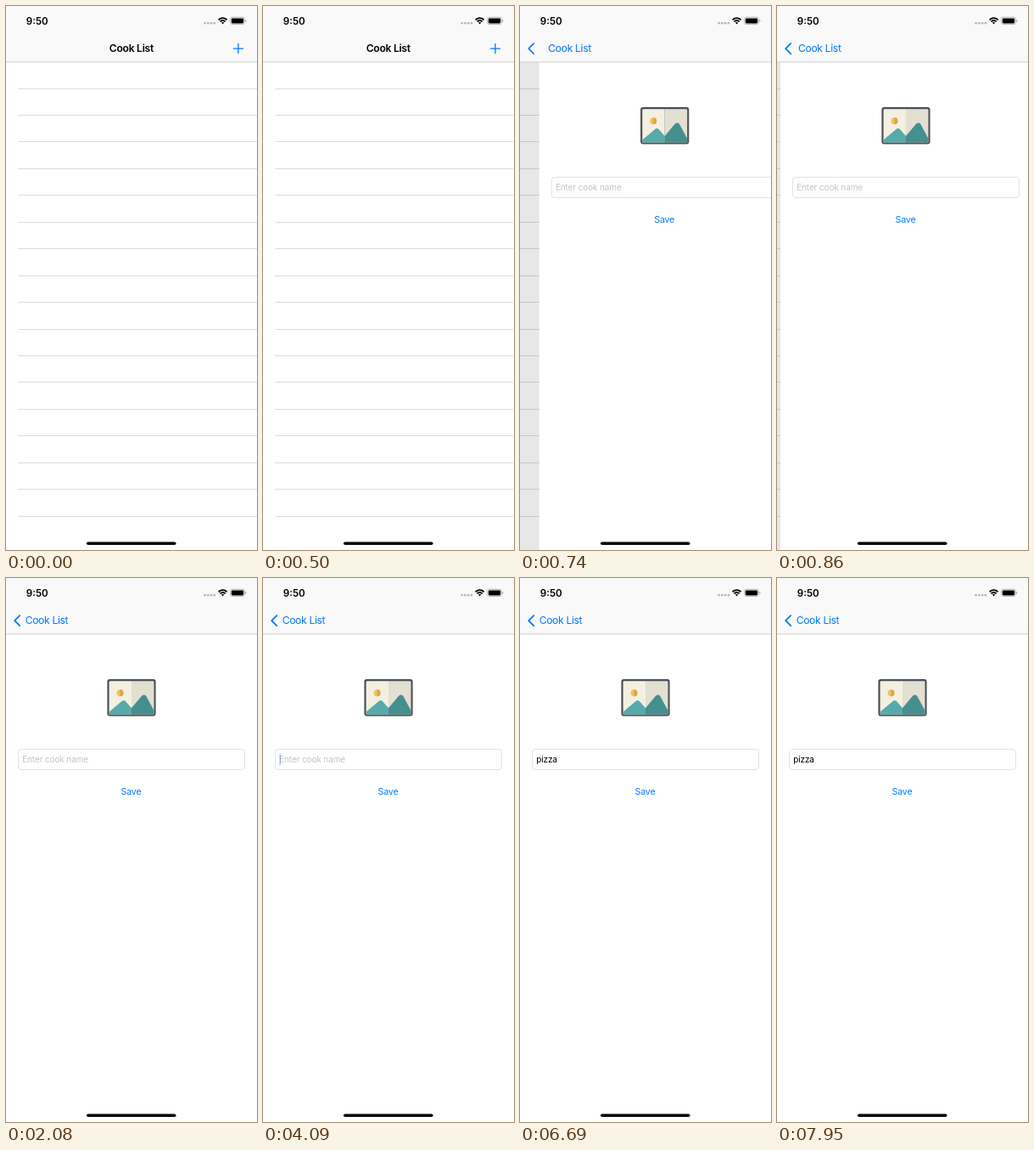
An HTML page that plays this animation: 296 px wide and 640 px high, repeating every 8000 ms.

```html
<!DOCTYPE html>
<html lang="en">
<head>
<meta charset="utf-8">
<title>Cook List</title>
<style>
  html, body { margin: 0; width: 100%; height: 100%; overflow: hidden; background: #fff; }
  svg { display: block; width: 296px; height: 640px; font-family: Inter, Roboto, sans-serif; }
  .blue { fill: #007aff; }
  .nav { font-size: 12.15px; text-anchor: middle; }
  .entry { font-size: 10px; letter-spacing: -.12px; }
</style>
</head>
<body>
<svg viewBox="0 0 296 640">
  <rect width="296" height="640" fill="#fff"/>
  <g id="list">
    <rect y="66" width="296" height="574" fill="#fff"/>
    <g id="rows" fill="#dcdcdc"></g>
  </g>
  <rect id="shade" y="66" width="296" height="574"/>

  <g id="form">
    <rect y="66" width="296" height="574" fill="#fff"/>
    <g id="picture">
      <rect x="119.4" y="119" width="57.2" height="43.6" rx="3" fill="#4b5056"/>
      <path d="M123 121.2H148V160.6H121.6V122.6Q121.6 121.2 123 121.2" fill="#f3f0e2"/>
      <path d="M148 121.2H173Q174.5 121.2 174.5 122.6V160.6H148Z" fill="#e3dfd3"/>
      <circle cx="134.5" cy="135.2" r="4" fill="#f0c160"/>
      <path d="M134.5 131.2a4 4 0 0 1 0 8Z" fill="#e2a445"/>
      <path d="M121.6 160.6V157.6L136.8 144.8Q139 143.2 141 145L148 153V160.6Z" fill="#56abaa"/>
      <path d="M148 160.6V153L160 138.8Q162.8 136.2 165.4 139L174.5 156V160.6Z" fill="#458f8e"/>
    </g>
    <rect x="14.5" y="201.5" width="267" height="24" rx="3.5" fill="#fff" stroke="#e3e3e3"/>
    <text id="hint" class="entry" x="19.2" y="217.3" fill="#c5c5c8">Enter cook name</text>
    <text id="typed" class="entry" x="19.2" y="217.3"></text>
    <rect id="caret" y="206.6" width="1.5" height="13.4" fill="#3f66d6"/>
    <text class="blue" x="147.5" y="254.8" font-size="10.7" letter-spacing="-.2" text-anchor="middle">Save</text>
  </g>

  <rect width="296" height="65.5" fill="#f9f9f9"/>
  <rect y="65.4" width="296" height="1" fill="#cfcfcf"/>
  <text x="23.8" y="22" font-size="11.6" font-weight="600">9:50</text>
  <g id="dots" fill="#b8b8b8"></g>
  <g fill="none" stroke="#000" stroke-width="1.8">
    <path d="M250.6 16.3Q255.6 11.9 260.6 16.3"/>
    <path d="M252.5 18.4Q255.6 15.7 258.7 18.4"/>
  </g>
  <path d="M253.9 19.6Q255.6 18.3 257.3 19.6L255.6 21.4Z"/>
  <rect x="264.6" y="13.2" width="16.8" height="8.4" rx="2.4" fill="none" stroke="#a6a6a6" stroke-width=".8"/>
  <rect x="265.8" y="14.4" width="14.4" height="6" rx="1.3"/>
  <path d="M282.3 16q1.2 .3 1.2 1.4t-1.2 1.4Z" fill="#a6a6a6"/>

  <path id="back" d="M16.2 44.2L10.2 50.2L16.2 56.2" fill="none" stroke="#007aff" stroke-width="1.9" stroke-linecap="round" stroke-linejoin="round"/>
  <path id="plus" d="M267.8 50.2H280M273.9 44.1V56.3" stroke="#007aff" stroke-width="1.3"/>
  <text id="title" class="nav" y="54.4" font-weight="600" letter-spacing="-.29">Cook List</text>
  <text id="backTitle" class="nav blue" y="54.4" letter-spacing="-.35">Cook List</text>

  <rect x="95" y="630.5" width="105.5" height="3.6" rx="1.8"/>
</svg>
<script>
const LOOP = 8000;
const PUSH_START = 496;
const PUSH_STEPS = [0, 500, 620, 740, 860, 960, 2080];

// [time, text, caret x]
const TYPING = [
  [0, '', 19.4], [4990, 'p', 25.2], [5200, 'pi', 27.5],
  [5390, 'piz', 32.7], [5570, 'pizz', 37.8], [6070, 'pizza', 43.2]
];
// [time, caret opacity]
const BLINK = [
  [0, 0], [3190, 1], [4090, .4], [4330, .1], [4450, 0], [4990, 1],
  [6690, .05], [6930, .5], [7050, 1], [7590, .5], [7710, .12], [7950, 0]
];

const $ = id => document.getElementById(id);
const set = (id, attrs) => {
  for (const key in attrs) $(id).setAttribute(key, attrs[key]);
};
const latest = (steps, t) => steps.filter(s => s[0] <= t).pop();

for (let i = 0; i < 17; i++) {
  $('rows').innerHTML += `<rect x="14.5" y="${Math.round(96.6 + i * 31.44)}" width="340" height="1"/>`;
}
for (let i = 0; i < 4; i++) {
  $('dots').innerHTML += `<circle cx="${234.6 + i * 3.75}" cy="20.2" r="1.35"/>`;
}

// Remaining share of a critically damped push, sampled in steps.
function remaining(t) {
  const step = PUSH_STEPS.filter(s => s <= t).pop();
  if (step < 500) return 1;
  if (step >= 2080) return 0;
  const x = (step - PUSH_START) * .0173;
  return (1 + x) * Math.exp(-x);
}

function render(t) {
  const left = remaining(t);
  const done = 1 - left;
  set('form', { transform: `translate(${296 * left})` });
  set('list', { transform: `translate(${-88.8 * done})` });
  set('shade', { opacity: .1 * done });

  const x = 47.9 + 100 * Math.pow(left, .87);
  set('title', { x, opacity: Math.pow(left, .8) });
  set('backTitle', { x, opacity: done });
  set('back', { opacity: done });
  set('plus', { opacity: left ** 3 });

  const [, text, caretX] = latest(TYPING, t);
  $('typed').textContent = text;
  set('hint', { opacity: text ? 0 : 1 });
  set('caret', { x: caretX, opacity: latest(BLINK, t)[1] });
}

const start = performance.now();
function tick() {
  render((performance.now() - start) % LOOP);
  requestAnimationFrame(tick);
}
tick();
</script>
</body>
</html>
```
